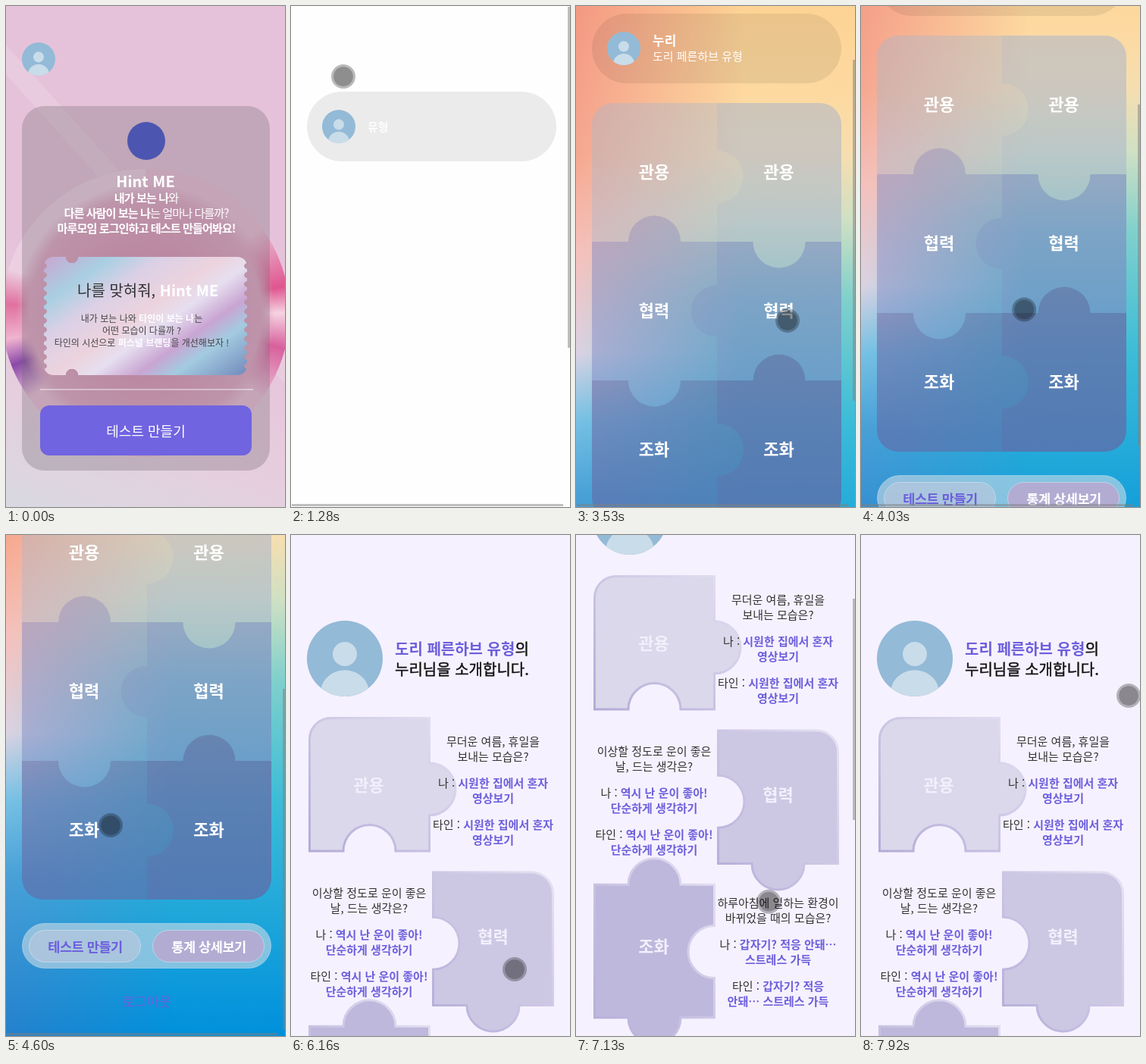
Write an HTML page that moves like this. It is 368 px wide and 661 px high and loops after 8 s.

```html
<!DOCTYPE html>
<html lang="ko">
<head>
<meta charset="utf-8">
<style>
html, body { margin: 0; width: 100%; height: 100%; overflow: hidden; }
#stage { position: relative; width: 368px; height: 661px; overflow: hidden; background: #fefefe; }
#stage div, svg { position: absolute; }
svg { left: 0; top: 0; }
text { font-family: "Noto Sans CJK KR", "Noto Sans CJK JP", "Noto Sans CJK", sans-serif; white-space: pre; }
.page { left: 0; top: 0; width: 368px; }
#home { height: 661px; background: linear-gradient(200deg, #e6c2da 55%, #e6cede 80%, #d8d9e2); }
.streak { left: -120px; top: 280px; width: 640px; height: 26px; background: #ecd6e4; opacity: .4; transform: rotate(48deg); }
.orb { left: -6px; top: 215px; width: 380px; height: 380px; border-radius: 50%;
  background: radial-gradient(closest-side, #d98fb0, #dc9cba 50%, #e0a9c5 80%, #e8b9d400 90%),
    conic-gradient(#eac0d8 15%, #e0558f 22%, #f6d3e2 25%, #d8609c 29%, #eac0d8 35% 65%, #8a4aa8 69%, #f0b4d0 72%, #e0709f 76%, #ecd0e2 80%); }
.card { left: 21px; top: 132px; width: 327px; height: 481px; border-radius: 30px; background: rgba(110, 100, 110, .3); }
.logo { left: 160px; top: 153px; width: 50px; height: 50px; border-radius: 50%; background: #4c56b0; }
.ticket { left: 50px; top: 331px; width: 268px; height: 156px; border-radius: 12px;
  background: linear-gradient(145deg, #c9a6d2, #a9cfe2 18%, #dcd0e6 32%, #ecd3dd 48%, #e6dff0 58%, #c9a5d2 70%, #a3cbe0 80%, #7189bb);
  mask: radial-gradient(circle at 37px 0, #0000 8px, #000 8.5px),
    radial-gradient(circle at 37px 156px, #0000 8px, #000 8.5px),
    radial-gradient(circle at 0 6px, #0000 3.5px, #000 4px) 0 6px / 100% 12px,
    radial-gradient(circle at 268px 6px, #0000 3.5px, #000 4px) 0 6px / 100% 12px;
  mask-composite: intersect; }
.rule { left: 45px; top: 505px; width: 281px; height: 2px; background: rgba(255, 255, 255, .4); }
.make { left: 45px; top: 527px; width: 279px; height: 66px; border-radius: 12px; background: #7064e0; }
#sky { height: 970px; background: linear-gradient(#fdce8a, #fdd9a0 220px, #f6deb0 300px, #cfe0c4 385px, #80d0cc 490px, #3cbcd8 650px, #0090dc 960px); }
#sky::before { content: ""; position: absolute; inset: 0;
  background: linear-gradient(#f3907c, #f5a78f 300px, #f6c0bc 430px, #dcd2e2 560px, #78c0e4 650px, #4a9fd6 750px, #2480cc 960px);
  mask: linear-gradient(90deg, #000, #0000 60%); }
#intro { height: 970px; background: #f6f1fe; }
#dot { width: 26px; height: 26px; margin: -16px; border: 3px solid rgba(0, 0, 0, .27); border-radius: 50%;
  background: rgba(0, 0, 0, .44) padding-box; }
.bar { background: rgba(128, 128, 128, .5); }
#thumb { left: 365px; width: 3px; }
#hbar { left: 1px; top: 657px; width: 358px; height: 3px; }
</style>
</head>
<body>
<div id="stage">
  <div id="home" class="page">
    <div class="streak"></div><div class="orb"></div><div class="card"></div><div class="logo"></div>
    <div class="ticket"></div><div class="rule"></div><div class="make"></div>
  </div>
  <div id="sky" class="page"></div>
  <div id="wait" class="page"></div>
  <div id="intro" class="page"></div>
  <div id="hbar" class="bar"></div>
  <div id="thumb" class="bar"></div>
  <div id="dot"></div>
</div>
<script>
const $ = id => document.getElementById(id);
const violet = '#6c5fdc';

// Text centred vertically on y; *...* marks the bold part, a thin stroke gives medium weight.
function text(x, y, size, str, o = {}) {
  const { fill = '#fff', bold = fill, anchor = 'middle', gap = 0, medium = false } = o;
  const body = str.replace(/\*(.+?)\*/g, `<tspan font-weight="700" fill="${bold}" stroke="none">$1</tspan>`);
  return `<text x="${x}" y="${y}" dy=".38em" font-size="${size}" fill="${fill}" text-anchor="${anchor}"
    letter-spacing="${gap}" stroke="${medium ? fill : 'none'}" stroke-width=".4">${body}</text>`;
}

const avatar = (x, y, size) => `<svg x="${x}" y="${y}" width="${size}" height="${size}" viewBox="0 0 100 100">
  <circle cx="50" cy="50" r="50" fill="#93bad7"/><circle cx="50" cy="44" r="16" fill="#c9dce9"/>
  <path d="M18.7 89A32 30 0 0 1 81.3 89A50 50 0 0 1 18.7 89z" fill="#c9dce9"/></svg>`;

const box = (x, y, w, h, fill, extra = '') =>
  `<rect x="${x}" y="${y}" width="${w}" height="${h}" rx="${h / 2}" fill="${fill}" ${extra}/>`;

// Jigsaw piece: knobs run top, right, bottom, left (1 out, -1 in);
// `round` is the index of its one round corner, counted from the top left.
function piece(x, y, w, h, knobs, round, shift, style) {
  const R = 34.5, mx = x + w / 2, my = y + h / 2 + shift;
  const [tl, tr, br, bl] = [0, 1, 2, 3].map(i => i === round ? 28 : 0);
  const knob = (i, axis, from, dx, dy) => knobs[i]
    ? `${axis}${from}a${R} ${R} 0 0 ${knobs[i] > 0 ? 1 : 0} ${dx * 2 * R} ${dy * 2 * R}` : '';
  const turn = (r, dx, dy) => r ? `a${r} ${r} 0 0 1 ${dx * r} ${dy * r}` : '';
  const d = `M${x + tl} ${y}` +
    knob(0, 'H', mx - R, 1, 0) + `H${x + w - tr}` + turn(tr, 1, 1) +
    knob(1, 'V', my - R, 0, 1) + `V${y + h - br}` + turn(br, -1, 1) +
    knob(2, 'H', mx + R, -1, 0) + `H${x + bl}` + turn(bl, -1, -1) +
    knob(3, 'V', my + R, 0, -1) + `V${y + tl}` + turn(tl, 1, -1) + 'z';
  return `<path d="${d}" ${style}/>`;
}

function draw(id, h, parts) {
  $(id).insertAdjacentHTML('beforeend', `<svg width="368" height="${h}">${parts.join('')}</svg>`);
}

const lead = ['내가 보는 나*와', '다른 사람이 보는 나*는 얼마나 다를까?', '마루모임 로그인하고 테스트 만들어봐요!*'];
const lines = ['내가 보는 나와 *타인이 보는 나*는', '어떤 모습이 다를까 ?', '타인의 시선으로 *퍼스널 브랜딩*을 개선해보자 !'];
draw('home', 661, [
  avatar(21, 48, 44),
  text(184, 231, 20, '*Hint ME*'),
  ...lead.map((s, i) => text(185, 253 + 20 * i, 15.2, '*' + s, { gap: -1 })),
  text(94, 375, 20, '나를 맞혀줘, *Hint ME*', { fill: '#333', bold: '#fff', anchor: 'start' }),
  ...lines.map((s, i) => text(179, 412 + 16 * i, 12, s, { fill: '#444', bold: '#fff' })),
  text(184.5, 561, 18, '테스트 만들기')
]);

const start = { anchor: 'start' };
const head = [box(21, 113, 329, 92, 'rgba(0,0,0,.075)'), avatar(41, 137, 44)];
draw('wait', 661, [...head, text(101, 159, 15, '유형', { ...start, medium: true })]);

// Six tiles: seams between them bulge in alternating directions.
const words = ['관용', '협력', '조화'];
const tints = ['170,182,203', '124,135,194', '108,96,160'];
const seam = (row, col) => row < 0 || row > 1 ? 0 : (row + col) % 2 ? 1 : -1;
const tile = (row, col) => {
  const y = 231 + 183 * row, side = row % 2 ? -1 : 1;
  const knobs = [-seam(row - 1, col), col ? 0 : side, seam(row, col), col ? -side : 0];
  const round = [col, -1, 3 - col][row];
  const fill = `fill="rgba(${tints[row]},${.42 + .05 * row + .12 * col})"`;
  return piece(21 + 165 * col, y, 165 - col, 183, knobs, round, row ? 0 : 6, fill) +
    text(103 + 164.5 * col, y + 91, 22, `*${words[row]}*`);
};
const rim = 'stroke="rgba(255,255,255,.35)"';
draw('sky', 970, [
  ...head,
  text(101, 149, 17, '*누리*', start),
  text(101, 169, 15, '도리 페른하브 유형', start),
  ...words.map((_, row) => tile(row, 0) + tile(row, 1)),
  box(21.5, 811.5, 328, 59, 'rgba(205,220,230,.6)', rim),
  box(30.5, 820.5, 147, 42, 'rgba(190,200,222,.6)', rim),
  box(193.5, 820.5, 147, 42, '#b2acd3', rim),
  text(104.5, 842, 17.6, '*테스트 만들기*', { fill: violet, gap: -.5 }),
  text(267.5, 842, 17.6, '*통계 상세보기*', { gap: -.5 }),
  text(185.5, 914, 17.6, '로그아웃', { fill: violet })
]);

// Four rows, the piece and its talk swapping sides.
const rows = [
  [[0, 1, -1, 0], '무더운 여름, 휴일을', '보내는 모습은?',
    '나 : *시원한 집에서 혼자*', '*영상보기*', '타인 : *시원한 집에서 혼자*', '*영상보기*'],
  [[0, 0, 1, -1], '이상할 정도로 운이 좋은', '날, 드는 생각은?',
    '나 : *역시 난 운이 좋아!*', '*단순하게 생각하기*', '타인 : *역시 난 운이 좋아!*', '*단순하게 생각하기*'],
  [[1, -1, 1, 0], '하루아침에 일하는 환경이', '바뀌었을 때의 모습은?',
    '나 : *갑자기? 적응 안돼…*', '*스트레스 가득*', '타인 : *갑자기? 적응*', '*안돼… 스트레스 가득*'],
  [[-1, 0, 0, 0], '팀 프로젝트 리더를 정해야']
];
const row = ([knobs, ...talk], i) => {
  const odd = i % 2, top = 272 + 200 * i - (i > 2 ? 10 : 0);
  const style = `fill="rgb(${218 - 14 * i},${216 - 16 * i},${234 - 7 * i})" stroke="url(#edge)" stroke-width="3"`;
  return piece(odd ? 187.5 : 24.5, 241.5 + 203.4 * i, 158, 175.5, knobs, i < 2 ? i : -1, i < 2 ? 6 : 1, style) +
    text(odd ? 266.5 : 102.5, 330 + 200 * i, 22, `*${words[i] || ''}*`, { fill: '#f3effc' }) +
    talk.map((s, n) => text(odd ? 103 : 266.5, top + 20 * n + 15 * (n >> 1), 15, s,
      { fill: '#333', bold: violet })).join('');
};
const title = { fill: '#111', bold: violet, anchor: 'start', medium: true };
draw('intro', 970, [
  `<linearGradient id="edge" x1="0" y1="1" x2="1" y2="0">
    <stop stop-color="#b3abd8"/><stop offset=".45" stop-color="#c9c3e3"/><stop offset="1" stop-color="#e6e2f3"/></linearGradient>`,
  avatar(21, 113, 100),
  text(137, 150, 20, '*도리 페른하브 유형*의', title),
  text(137, 177, 20, '누리님을 소개합니다.', title),
  ...rows.map(row)
]);

// Each key: time, then values.
const pointer = [[300, 95, 497], [720, 24, 210], [980, 69, 93], [1380, 69, 93], [2370, 284, 230], [3530, 279, 415],
  [4600, 138, 383], [5380, 294, 573], [6160, 295, 573], [6840, 269, 544], [7820, 199, 260], [7920, 353, 212]];
const skyScroll = [[1480, 0], [2370, 85], [3530, 103], [4600, 299]];
const introScroll = [[6300, 0], [6840, 199], [7000, 205], [7720, 0]];

function at(keys, t) {
  const i = keys.findIndex(k => k[0] > t);
  if (i < 0) return keys.at(-1).slice(1);
  if (!i) return keys[0].slice(1);
  const a = keys[i - 1], b = keys[i];
  const u = (t - a[0]) / (b[0] - a[0]), e = u * u * (3 - 2 * u);
  return a.slice(1).map((v, j) => v + (b[j + 1] - v) * e);
}

const show = (id, on) => $(id).style.visibility = on ? 'visible' : 'hidden';

const began = performance.now();
function frame() {
  const t = (performance.now() - began) % 8000, last = t >= 6160;
  const [x, y] = at(pointer, t);
  const [scroll] = at(last ? introScroll : skyScroll, t);
  show('home', t < 1280);
  show('wait', t >= 1280 && t < 1380);
  show('sky', t >= 1380 && !last);
  show('intro', last);
  show('dot', t >= 300);
  show('hbar', t >= 1280 && t < 5200);
  show('thumb', t >= 1280 && t < 5200 || t >= 6300 && t < 7780);
  $('sky').style.transform = $('intro').style.transform = `translateY(${-Math.round(scroll)}px)`;
  $('dot').style.transform = `translate(${x}px, ${y}px)`;
  $('thumb').style.height = (last ? 292 : 450) + 'px';
  $('thumb').style.top = 1 + scroll * (last ? .445 : .675) + 'px';
  requestAnimationFrame(frame);
}
frame();
</script>
</body>
</html>
```
